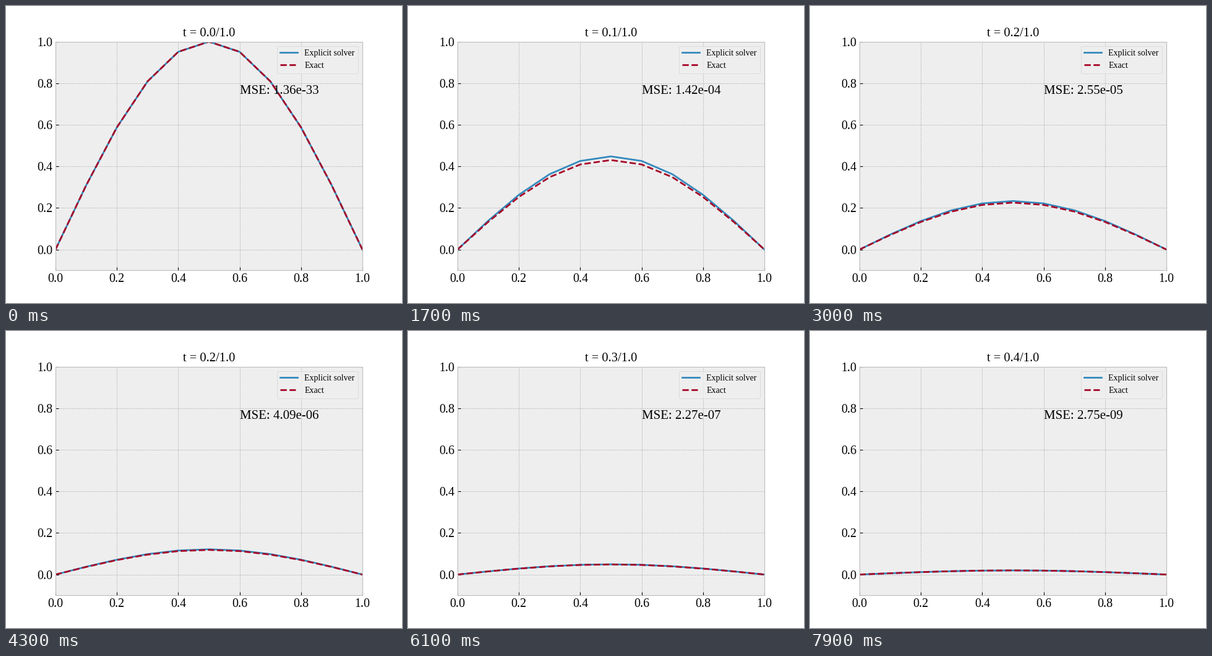
A matplotlib script for the animation above (8000 ms loop, 640 by 480 pixels).

```python
import numpy as np
import matplotlib.pyplot as plt
from matplotlib.animation import FuncAnimation

FRAMES = 80
STEPS = 200
N = 11

plt.style.use("bmh")
plt.rcParams.update({
    "font.family": "Liberation Serif",
    "font.size": 10,
    "axes.titlesize": 14.8,
    "xtick.labelsize": 14.4,
    "ytick.labelsize": 14.4,
    "legend.fontsize": 10,
    "figure.facecolor": "white",
    "savefig.facecolor": "white",
})

x = np.linspace(0, 1, N)
times = np.linspace(0, 1, STEPS)
dt = 1 / STEPS
r = dt / (x[1] - x[0]) ** 2


def solve():
    """Explicit finite differences for the heat equation, zero at both ends."""
    u = np.zeros((FRAMES, N))
    u[0, 1:-1] = np.sin(np.pi * x)[1:-1]
    for k in range(FRAMES - 1):
        u[k + 1, 1:-1] = u[k, 1:-1] + r * np.diff(u[k], 2)
    return u


def exact(t):
    return np.exp(-np.pi**2 * t) * np.sin(np.pi * x)


numeric = solve()

fig, ax = plt.subplots(figsize=(6.4, 4.8), dpi=100)
ax.set(xlim=(0, 1), ylim=(-0.1, 1))
ticks = np.linspace(0, 1, 6)
ax.set_xticks(ticks)
ax.set_yticks(ticks)

solver_line, = ax.plot(x, numeric[0], color="#348ABD", lw=2, label="Explicit solver")
exact_line, = ax.plot(x, exact(0), "--", color="#A60628", lw=2, label="Exact")
ax.legend(loc="upper right")
title = ax.set_title("")
error = ax.text(0.6, 0.75, "", fontsize=15)


def update(k):
    # the solver curve trails the exact one by one step
    u, v = numeric[max(k - 1, 0)], exact(times[k])
    solver_line.set_ydata(u)
    exact_line.set_ydata(v)
    title.set_text(f"t = {times[k]:.1f}/1.0")
    error.set_text(f"MSE: {np.mean((u - v) ** 2):.2e}")
    return solver_line, exact_line, title, error


anim = FuncAnimation(fig, update, frames=FRAMES, interval=100,
                     repeat=True, repeat_delay=0, blit=False)
plt.show()
```
